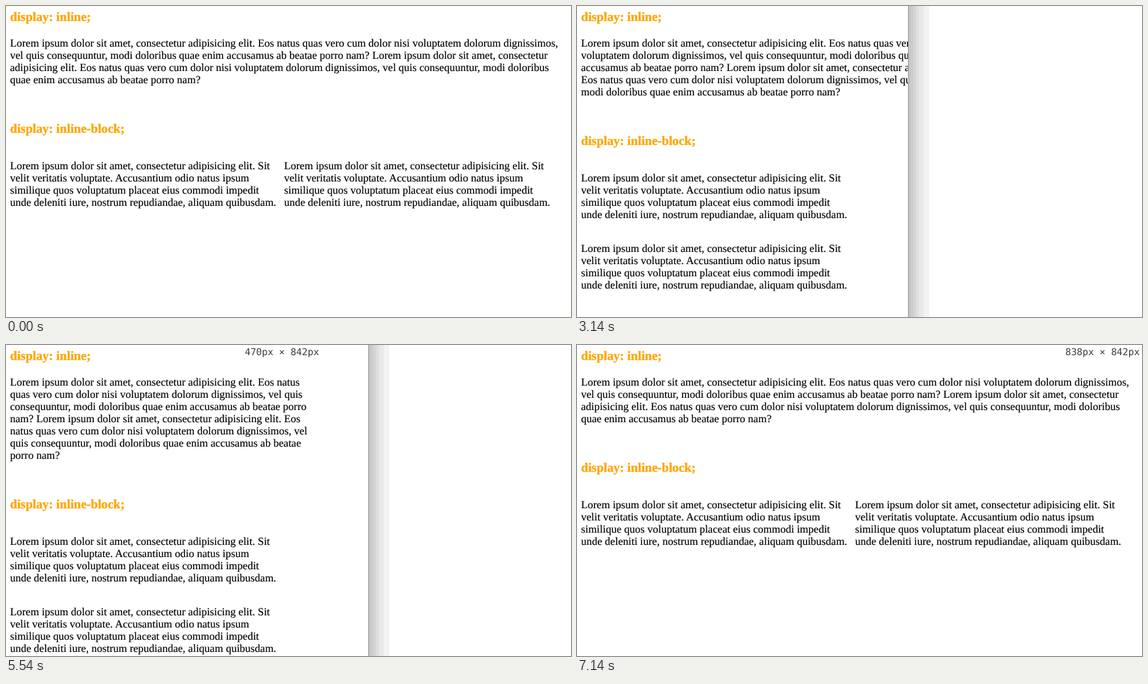
An HTML page that plays this animation: 833x459 px, repeating every 8000 ms.

```html
<!DOCTYPE html>
<html lang="en">
<head>
<meta charset="utf-8">
<title>Inline and inline-block</title>
<style>
  html, body { margin: 0; width: 100%; height: 100%; overflow: hidden; background: #fff; }
  #view { position: absolute; left: 0; top: 0; height: 459px; overflow: hidden; }
  #page {
    position: absolute; left: 6px; top: 6px;
    font: 16px/18px "Liberation Serif", Times, serif;
    font-kerning: normal; text-rendering: geometricPrecision;
    color: #000; -webkit-text-stroke: 0.15px;
  }
  h3 {
    margin: 0; font-size: 18.72px; line-height: 22px;
    color: orange; -webkit-text-stroke: 0.35px; white-space: nowrap;
  }
  .text { margin: 19px 0 52px; }
  .blocks { margin-top: 19px; }
  .blocks p { display: inline-block; width: 400px; margin: 16px 0; }
  #size {
    position: absolute; top: 3px; white-space: pre; color: #3c3c3c;
    font: 14px/16px "DejaVu Sans Mono", monospace; text-rendering: geometricPrecision;
  }
  #shadow {
    position: absolute; top: 0; width: 31px; height: 459px;
    background: linear-gradient(90deg,
      #999 1px, #c6c6c6 1px 4px, #cdcdcd 4px 8px, #d6d6d6 8px 12px,
      #dfdfdf 12px 16px, #e9e9e9 16px 23px, #f3f3f3 23px);
  }
</style>
</head>
<body>
<div id="view">
  <div id="page">
    <h3>display: inline;</h3>
    <div class="text">
      <span>Lorem ipsum dolor sit amet, consectetur adipisicing elit. Eos natus quas vero cum dolor nisi voluptatem dolorum dignissimos, vel quis consequuntur, modi doloribus quae enim accusamus ab beatae porro nam?</span>
      <span>Lorem ipsum dolor sit amet, consectetur adipisicing elit. Eos natus quas vero cum dolor nisi voluptatem dolorum dignissimos, vel quis consequuntur, modi doloribus quae enim accusamus ab beatae porro nam?</span>
    </div>
    <h3>display: inline-block;</h3>
    <div class="blocks">
      <p>Lorem ipsum dolor sit amet, consectetur adipisicing elit. Sit velit veritatis voluptate. Accusantium odio natus ipsum similique quos voluptatum placeat eius commodi impedit unde deleniti iure, nostrum repudiandae, aliquam quibusdam.</p>
      <p>Lorem ipsum dolor sit amet, consectetur adipisicing elit. Sit velit veritatis voluptate. Accusantium odio natus ipsum similique quos voluptatum placeat eius commodi impedit unde deleniti iure, nostrum repudiandae, aliquam quibusdam.</p>
    </div>
  </div>
  <div id="size"></div>
</div>
<div id="shadow"></div>
<script>
const LOOP = 8000, TICK = 80, PHASE = 20, LABEL_FROM = 500;
const get = id => document.getElementById(id);
const view = get('view'), page = get('page'), size = get('size'), shadow = get('shadow');

// Key points of the drag: time, window edge, layout width (which follows late).
const keys = [
  [420, 836, 838], [580, 823, 825],
  [740, 823, 825], [1620, 670, 690], [2020, 656, 658],
  [2500, 656, 658], [3140, 488, 612], [3460, 447, 449],
  [3700, 447, 449], [3780, 446, 448],
  [4420, 446, 448], [4740, 455, 456], [5540, 534, 470], [6420, 754, 589],
  [6820, 827, 660], [7060, 836, 740], [7140, 836, 838]
];

function slope(i, col) {
  const a = keys[i], b = keys[i + 1];
  return a && b ? (b[col] - a[col]) / (b[0] - a[0]) : 0;
}

// Harmonic mean of both sides: zero at rests, never overshoots.
function tangent(i, col) {
  const a = slope(i - 1, col), b = slope(i, col);
  return a * b > 0 ? 2 * a * b / (a + b) : 0;
}

// Cubic Hermite curve through the key points.
function valueAt(t, col) {
  const last = keys.length - 1;
  if (t <= keys[0][0]) return keys[0][col];
  if (t >= keys[last][0]) return keys[last][col];
  const i = keys.findIndex(key => key[0] > t) - 1;
  const [a, b] = [keys[i], keys[i + 1]];
  const span = b[0] - a[0], u = (t - a[0]) / span, v = 1 - u;
  return Math.round(
    v * v * (1 + 2 * u) * a[col] + u * u * (3 - 2 * u) * b[col] +
    u * v * span * (v * tangent(i, col) - u * tangent(i + 1, col)));
}

function draw(time) {
  const t = Math.floor((time - PHASE) / TICK) * TICK + PHASE;
  const edge = valueAt(t, 1), width = valueAt(t, 2);
  view.style.width = shadow.style.left = edge + 'px';
  page.style.width = width - 16 + 'px';
  size.style.left = width - 118 + 'px';
  size.style.visibility = t < LABEL_FROM ? 'hidden' : 'visible';
  size.textContent = width + 'px × 842px';
}

const began = performance.now();
function frame() {
  draw((performance.now() - began) % LOOP);
  requestAnimationFrame(frame);
}
frame();
</script>
</body>
</html>
```
